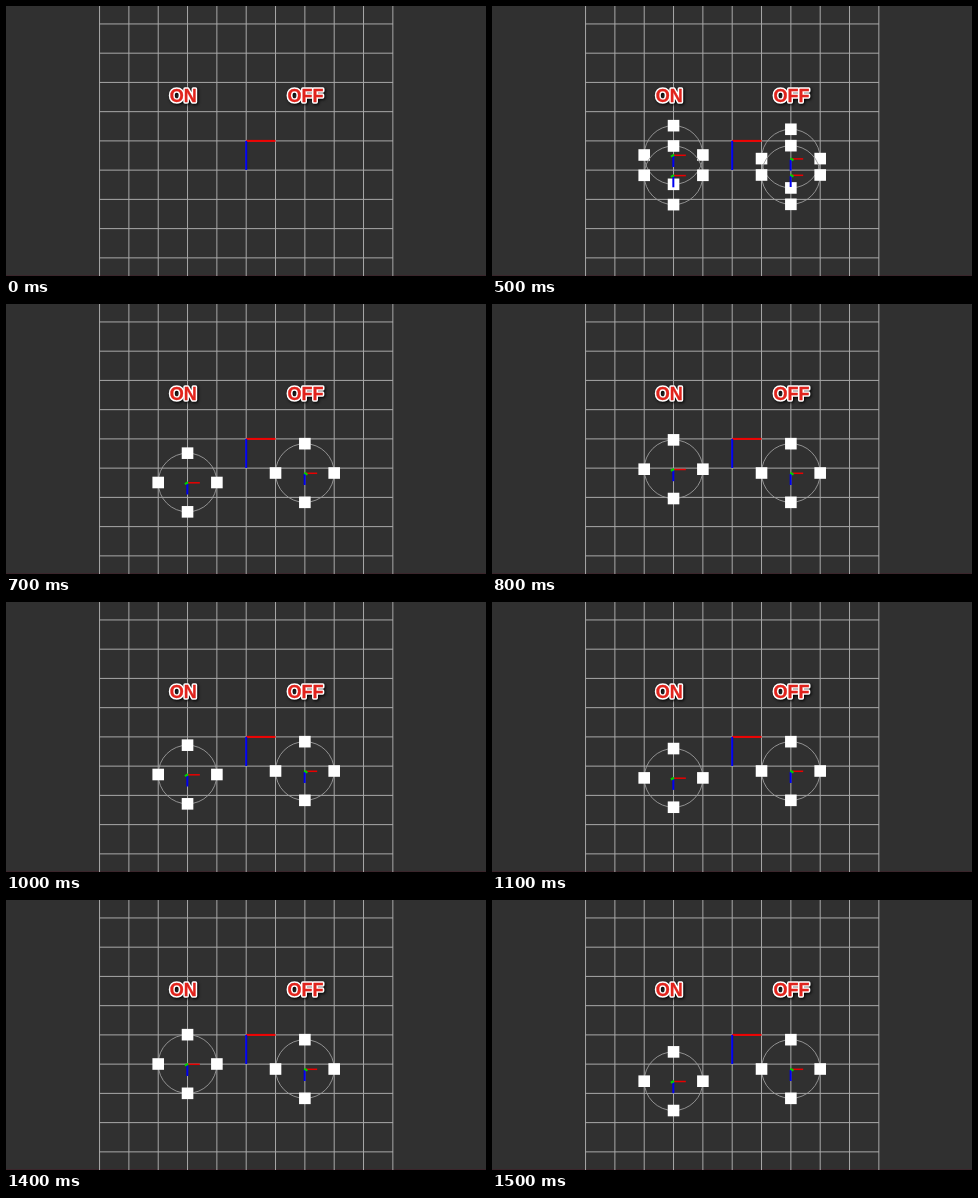
These frames come from a looping animation (480 by 270 pixels, 1600 ms). An HTML page with a canvas:

```html
<!DOCTYPE html>
<html lang="en">
<head>
<meta charset="utf-8">
<title>ON / OFF markers</title>
<style>
  html, body { margin: 0; width: 100%; height: 100%; overflow: hidden; background: #303030; }
  canvas { display: block; }
</style>
</head>
<body>
<canvas id="stage" width="480" height="270"></canvas>
<script>
const ctx = document.getElementById('stage').getContext('2d');
const LOOP = 1600, START = 500, STEP = 100;
const CX = 240.2, CY = 134.9, CELL_W = 29.33, CELL_H = 29.24;
const RADIUS = 29.33, REST = 169;
const LEFT = CX - 2 * CELL_W, RIGHT = CX + 2 * CELL_W;

// Heights of the two markers, one row per step
const STEPS = [
  { on: [149, 169.3], off: [152.6, REST] },
  ...[192.3, 178.5, 165.2, 169, 172.5, 175.9, 161.5, 147.2, 164, 181.2]
    .map(y => ({ on: [y], off: [REST] }))
];

function line(x1, y1, x2, y2, color, width = 1) {
  ctx.strokeStyle = color;
  ctx.lineWidth = width;
  ctx.beginPath();
  ctx.moveTo(x1, y1);
  ctx.lineTo(x2, y2);
  ctx.stroke();
}

function drawGrid() {
  ctx.fillStyle = '#303030';
  ctx.fillRect(0, 0, 480, 270);
  ctx.fillStyle = '#3a252b';
  ctx.fillRect(0, 269, 480, 1);
  for (let i = -5; i <= 5; i++) {
    const x = CX + i * CELL_W;
    const y = CY + i * CELL_H;
    line(x, 0, x, 270, '#a8a8a8');
    line(93, y, 387, y, '#a8a8a8');
  }
  line(CX, CY, 269.5, CY, '#f00000', 2);
  line(CX, CY, CX, 164, '#0000f0', 2);
}

function drawRing(x, y) {
  ctx.strokeStyle = '#9c9c9c';
  ctx.lineWidth = 0.9;
  ctx.beginPath();
  ctx.arc(x, y, RADIUS, 0, 2 * Math.PI);
  ctx.stroke();
  ctx.fillStyle = '#fff';
  for (const [dx, dy] of [[0, -1], [1, 0], [0, 1], [-1, 0]]) {
    ctx.fillRect(x + dx * RADIUS - 5.8, y + dy * RADIUS - 5.8, 11.6, 11.6);
  }
}

function drawAxes(x, y) {
  const side = Math.sign(x - CX);
  line(x, y + 0.3, x + 12.3, y + 0.3, '#e80000', 1.5);
  line(x - 0.2, y + 1, x - 0.2, y + 12, '#0000f0', 2);
  line(x - side * 0.5, y - 0.2, x + side * 2.6, y + 1.6, '#00d000', 2.2);
}

function drawMarkers(x, heights) {
  heights.forEach(y => drawRing(x, y));
  heights.forEach(y => drawAxes(x, y));
}

function drawLabel(text, x) {
  ctx.font = 'bold 18px "Liberation Sans", Arial, sans-serif';
  ctx.textAlign = 'center';
  ctx.lineJoin = 'round';
  ctx.save();
  ctx.shadowColor = '#000';
  ctx.shadowBlur = 3;
  ctx.shadowOffsetX = ctx.shadowOffsetY = 1;
  ctx.strokeStyle = '#fff';
  ctx.lineWidth = 3.4;
  ctx.strokeText(text, x, 96);
  ctx.restore();
  ctx.fillStyle = ctx.strokeStyle = '#e0231c';
  ctx.lineWidth = 0.3;
  ctx.fillText(text, x, 96);
  ctx.strokeText(text, x, 96);
}

function draw(t) {
  drawGrid();
  if (t >= START) {
    const { on, off } = STEPS[Math.floor((t - START) / STEP)];
    drawMarkers(LEFT, on);
    drawMarkers(RIGHT, off);
  }
  drawLabel('ON', 177.2);
  drawLabel('OFF', 299.4);
}

const begin = performance.now();
function tick() {
  draw((performance.now() - begin) % LOOP);
  requestAnimationFrame(tick);
}
tick();
</script>
</body>
</html>
```
